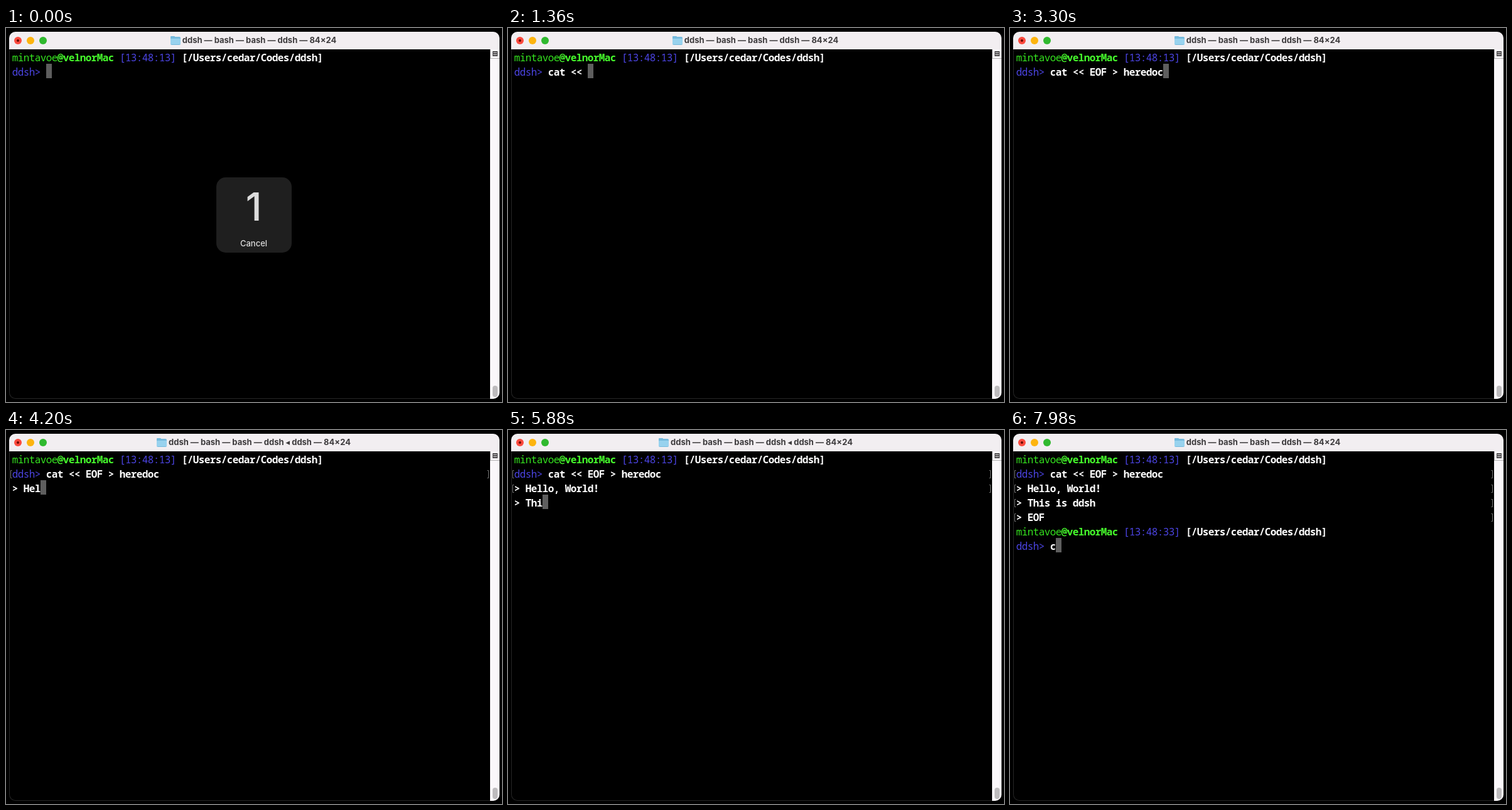
An HTML page with a canvas that plays this animation: 790x596 px, repeating every 8000 ms.

```html
<!DOCTYPE html>
<html lang="en">
<head>
<meta charset="utf-8">
<title>Terminal heredoc</title>
<style>
  html, body { margin: 0; width: 100%; height: 100%; overflow: hidden; background: #000; }
  canvas { display: block; }
</style>
</head>
<body>
<canvas id="stage" width="790" height="596"></canvas>
<script>
const ctx = document.getElementById('stage').getContext('2d');
const LOOP = 8000, CELL = 9, LINE = 23, LEFT = 10, TOP = 34;
const MONO = '"Noto Sans Mono", "DejaVu Sans Mono", monospace';
const SANS = 'Inter, "DejaVu Sans", sans-serif';
const WHITE = '#fff', GREEN = '#35e51f', LIME = '#46fb2c', BLUE = '#4b44e2';

const KEYS = 'cat << EOF > heredoc\nHello, World!\nThis is ddsh\nEOF\nc';
// [time in ms, keys pressed so far]
const RHYTHM = [
  [250, 0], [1300, 7], [2460, 15], [3100, 20], [3500, 21], [4140, 24], [5340, 34], [5500, 35],
  [5840, 38], [6860, 47], [7000, 48], [7180, 49], [7420, 51], [7620, 52], [7960, 53]
];

function keysAt(t) {
  const next = RHYTHM.findIndex(([time]) => time > t);
  if (next === 0) return 0;
  if (next < 0) return KEYS.length;
  const [t0, k0] = RHYTHM[next - 1], [t1, k1] = RHYTHM[next];
  return Math.floor(k0 + (k1 - k0) * (t - t0) / (t1 - t0));
}

function box(x, y, w, h, color, radius = 0) {
  ctx.fillStyle = color;
  ctx.beginPath();
  ctx.roundRect(x, y, w, h, radius);
  ctx.fill();
}

function disc(x, y, r, color) {
  box(x - r, y - r, 2 * r, 2 * r, color, r);
}

function label(text, x, y, font, color) {
  ctx.font = `${font} ${SANS}`;
  ctx.textAlign = 'center';
  ctx.fillStyle = color;
  ctx.fillText(text, x, y);
}

// Writes one character per terminal cell.
function write(row, col, text, color, weight = 600) {
  ctx.font = `${weight} 16px ${MONO}`;
  ctx.textAlign = 'center';
  ctx.fillStyle = color;
  [...text].forEach((ch, i) =>
    ctx.fillText(ch, LEFT + (col + i + 0.5) * CELL, TOP + row * LINE + 19));
}

function prompt(row, time) {
  write(row, 0, 'mintavoe', GREEN, 500);
  write(row, 8, '@velnorMac', LIME);
  write(row, 19, `[${time}]`, BLUE, 500);
  write(row, 30, '[/Users/cedar/Codes/ddsh]', WHITE);
  write(row + 1, 0, 'ddsh>', BLUE, 500);
}

function lineMarks(row) {
  const y = TOP + row * LINE + 7.5;
  ctx.strokeStyle = '#777';
  ctx.lineWidth = 1;
  ctx.beginPath();
  for (const [x, dx] of [[7.5, 2], [768.5, -2]]) {
    ctx.moveTo(x + dx, y);
    ctx.lineTo(x, y);
    ctx.lineTo(x, y + 12);
    ctx.lineTo(x + dx, y + 12);
  }
  ctx.stroke();
}

function drawWindow(running) {
  box(0, 0, 790, 596, '#000');
  box(5, 6, 781, 585, '#262626', 10);
  ctx.save();
  ctx.beginPath();
  ctx.roundRect(5, 6, 781, 585, 10);
  ctx.clip();
  box(5, 6, 781, 28, '#f2eef1');
  box(771, 34, 15, 557, '#faf7fa');
  ctx.restore();
  box(6, 34, 765, 556, '#000', [0, 0, 0, 9]);

  disc(19, 20, 6, '#fb4a3e');
  disc(19, 20, 2, '#690b00');
  disc(39, 20, 6, '#fdb40e');
  disc(59, 20, 6, '#30b92f');

  const icon = running ? 240 : 262;
  box(icon, 13, 7, 4, '#72b9dc', 1);
  box(icon, 14, 16, 13, '#76bbde', 2);
  box(icon, 17, 16, 9, '#98d2ee', 1);
  label(`ddsh — bash — bash — ddsh ${running ? '◂ ddsh ' : ''}— 84×24`,
    running ? 404 : 403.5, 24, '700 13px', '#3d3b3d');

  box(771, 48, 15, 1, '#b4b2b4');
  box(771, 34, 1, 14, '#b4b2b4');
  box(775, 37, 8, 8, '#484648');
  box(776, 39, 6, 1, '#e4e2e4');
  box(776, 42, 6, 1, '#e4e2e4');
  box(775, 570, 8, 18, '#bdbbbd', 4);
}

function drawTerminal(lines) {
  prompt(0, '13:48:13');
  lines.forEach((text, i) => {
    const row = i < 4 ? i + 1 : 6;
    const indent = i === 0 || i === 4 ? 6 : 2;
    if (i === 4) prompt(5, '13:48:33');
    else if (i > 0) write(row, 0, '>', WHITE);
    write(row, indent, text, WHITE);
    if (i < lines.length - 1) lineMarks(row);
    else box(LEFT + (indent + text.length) * CELL, TOP + row * LINE, CELL, LINE, '#5e5e5e');
  });
}

function drawCountdown(t) {
  const alpha = 1 - t / 220;
  if (alpha <= 0) return;
  ctx.globalAlpha = alpha;
  box(335, 238, 120, 120, '#202020', 15);
  label('1', 394.5, 307, '500 62px', '#dedede');
  label('Cancel', 394.5, 348, '500 13px', '#dedede');
  ctx.globalAlpha = 1;
}

function frame(now) {
  const t = now % LOOP;
  const lines = KEYS.slice(0, keysAt(t)).split('\n');
  drawWindow(lines.length > 1 && lines.length < 5);
  drawTerminal(lines);
  drawCountdown(t);
  requestAnimationFrame(frame);
}
frame(0);
</script>
</body>
</html>
```
